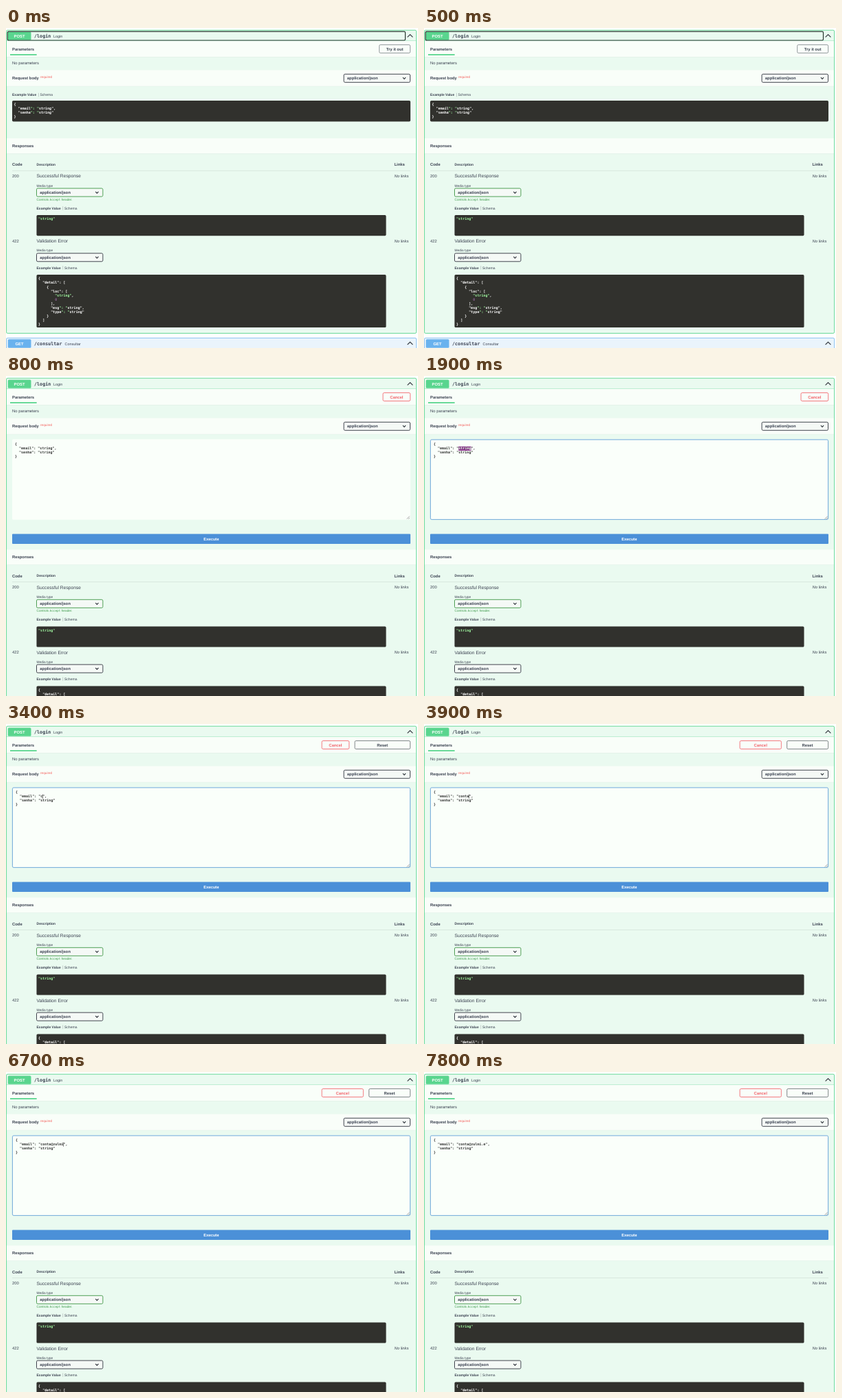
Recreate the animation shown at these times as an HTML page. Size 600x467 px, loop 8000 ms.

```html
<!DOCTYPE html>
<html lang="en">
<head>
<meta charset="utf-8">
<title>API form</title>
<style>
html, body { margin: 0; width: 100%; height: 100%; overflow: hidden; background: #fff; }
svg { display: block; width: 100vw; height: 100vh; }
text { font-family: "Liberation Sans", Arial, sans-serif; fill: #3b4151; white-space: pre; text-rendering: geometricPrecision; }
.b { font-weight: 700; }
.i { font-style: italic; }
.m { font-family: "DejaVu Sans Mono", monospace; }
.str { fill: #a2fca2; }
.num { fill: #8d5f95; }
</style>
</head>
<body>
<svg id="stage" viewBox="0 0 600 467" preserveAspectRatio="none"></svg>
<script>
const NS = 'http://www.w3.org/2000/svg';
const stage = document.getElementById('stage');
const INK = '#3b4151', GREEN = '#59d58e', RED = '#f2616b', BLUE = '#4b90d8';
const S = 5.88, SMALL = 5.04, BIG = 6.72, PITCH = SMALL * 0.602;
const LOOP = 8000, GROW = 92.3;

function add(parent, tag, attrs = {}) {
  const el = document.createElementNS(NS, tag);
  for (const k in attrs) el.setAttribute(k, attrs[k]);
  parent.appendChild(el);
  return el;
}
const group = parent => add(parent, 'g');
const show = (el, on) => el.setAttribute('display', on ? 'inline' : 'none');

// y is the middle of the capitals
function text(parent, str, x, y, size, cls = '', extra = {}) {
  const el = add(parent, 'text', { x, y: y + size * 0.35, 'font-size': size, class: cls, ...extra });
  el.textContent = str;
  return el;
}
const middle = (fill = INK) => ({ 'text-anchor': 'middle', style: `fill:${fill}` });

function rect(parent, x, y, width, height, fill, extra = {}) {
  return add(parent, 'rect', { x, y, width, height, fill, ...extra });
}
const outline = (stroke, w = 0.85) => ({ stroke, 'stroke-width': w, rx: 1.7 });

function bar(parent, y, h) {
  rect(parent, 1, y + 0.5, 596, h, '#dfeee5');
  rect(parent, 1, y, 596, h, '#f9fef9');
}
function chevron(parent, x, y, w, h) {
  add(parent, 'path', { d: `M${x - w} ${y + h}L${x} ${y - h}L${x + w} ${y + h}`, fill: 'none', stroke: '#30343c', 'stroke-width': 1.15 });
}
function select(parent, x, y, stroke) {
  rect(parent, x, y, 96.5, 12, '#f5f9f6', outline(stroke, 1));
  text(parent, 'application/json', x + 4.8, y + 6, S, 'b');
  chevron(parent, x + 88, y + 6, 2.1, -1.1);
}
function tabs(parent, x, y) {
  text(parent, 'Example Value', x, y, SMALL, 'b');
  rect(parent, x + 38.2, y - 2.8, 0.4, 5.6, '#8b9099');
  text(parent, 'Schema', x + 40.5, y, SMALL);
}
// Colours quoted values and numbers, keeps keys white
function code(parent, lines, x, y) {
  lines.forEach((line, n) => {
    const el = text(parent, '', x, y + n * 6.03, SMALL, 'm b', { style: 'fill:#fff' });
    line.split(/("[^"]*"(?!:)|\b\d+\b)/).forEach(part => {
      const cls = /^"[^"]*"$/.test(part) ? 'str' : /^\d+$/.test(part) ? 'num' : '';
      const span = add(el, 'tspan', cls ? { class: cls } : {});
      span.textContent = part;
    });
  });
}
function codeBox(parent, x, y, w, h, lines) {
  rect(parent, x, y, w, h, '#31312d', { rx: 1.7 });
  code(parent, lines, x + 2.6, y + 5.6);
}
function button(parent, x, w, label, colour, ink) {
  const box = rect(parent, x, 24.5, w, 12, '#f9fef9', outline(colour));
  const txt = text(parent, label, x + w / 2, 30.5, S, 'b', middle(ink));
  return (nx, nw) => {
    box.setAttribute('x', nx);
    box.setAttribute('width', nw);
    txt.setAttribute('x', nx + nw / 2);
  };
}
function summary(parent, y, verb, colour, path, label, labelX) {
  rect(parent, 2.8, y - 6.2, 33.7, 12.4, colour, { rx: 1.5 });
  text(parent, verb, 19.6, y + 0.2, S, 'b', middle('#fff'));
  text(parent, path, 41, y, BIG, 'm b');
  text(parent, label, labelX, y + 0.1, 5.46);
  chevron(parent, 588.5, y - 0.2, 3.9, 1.9);
}
function response(parent, y, status, title, stroke) {
  text(parent, status, 9, y, S);
  text(parent, title, 44.5, y + 0.3, BIG);
  text(parent, 'No links', 565.5, y, S, 'i');
  text(parent, 'Media type', 44.5, y + 14.1, 4.85);
  select(parent, 44.5, y + 18.2, stroke);
}

// Operation block
const block = rect(stage, 0.6, 3.2, 597, 442.3, '#eafaf0', outline(GREEN, 0.9));
rect(stage, 1, 18.3, 596, 0.5, '#8fdfb4');
bar(stage, 19, 23);
summary(stage, 11.6, 'POST', GREEN, '/login', 'Login', 69);
const focusRing = rect(stage, 2.2, 5.2, 579.3, 12.8, 'none', outline('#26362e', 1.2));
text(stage, 'Parameters', 9, 30.7, S, 'b');
rect(stage, 6, 38.1, 38.7, 1.8, GREEN);
text(stage, 'No parameters', 9, 50.6, S);
bar(stage, 61.5, 23.3);
text(stage, 'Request body', 9, 73.1, S, 'b');
text(stage, 'required', 50, 71.6, 4.7, '', { style: 'fill:#f4605c' });
select(stage, 492, 67.3, '#41444e');

// Read-only view
const idle = group(stage);
button(idle, 543.6, 45, 'Try it out', '#858a90', INK);
tabs(idle, 9, 97.6);
codeBox(idle, 9, 106, 580, 30.4, ['{', '  "email": "string",', '  "senha": "string"', '}']);

// Editing view
const edit = group(stage);
const area = rect(edit, 9, 92.3, 580, 117.5, '#fafffa', { rx: 1.7 });
const ring = rect(edit, 9.4, 92.9, 579.2, 116.5, 'none', outline('#5f9fd6', 0.9));
add(edit, 'path', { d: 'M583.8 208.6l4-4M586 208.8l1.9-1.9', stroke: '#666', 'stroke-width': 0.6 });
const mark = rect(edit, 0, 102.8, 6 * PITCH, 6.2, '#8c3a8e');
const body = group(edit);
const rows = [0, 1, 2, 3].map(n => text(body, '', 13, 99.2 + n * 5.88, SMALL, 'm b', { style: 'fill:#333' }));
const picked = text(edit, 'string', 0, 105.6, SMALL, 'm b', { style: 'fill:#fff' });
const caret = rect(edit, 0, 102.7, 0.6, 6.2, '#222');
rect(edit, 9, 230.6, 580, 14.5, BLUE, { rx: 1 });
text(edit, 'Execute', 299, 238, S, 'b', middle('#fff'));
const cancel = button(edit, 549, 39.7, 'Cancel', RED, RED);
const resetGroup = group(edit);
const reset = button(resetGroup, 508, 80.6, 'Reset', '#6d7277', INK);

// Responses and the next operation
const lower = group(stage);
bar(lower, 161, 22);
text(lower, 'Responses', 9, 172, S, 'b');
text(lower, 'Code', 9, 199.3, S, 'b');
text(lower, 'Description', 44.5, 199.1, SMALL, 'b');
text(lower, 'Links', 565.5, 199.3, S, 'b');
rect(lower, 9, 207.9, 580, 0.5, '#c3d2ca');
response(lower, 215.8, '200', 'Successful Response', '#4f9f55');
const note = text(lower, 'Controls ', 44.5, 250.4, 4.75, '', { style: 'fill:#3f9a4c' });
add(note, 'tspan', { class: 'm', 'font-size': 4.4 }).textContent = 'Accept';
add(note, 'tspan').textContent = ' header.';
tabs(lower, 44.5, 262.9);
codeBox(lower, 44.5, 273.1, 509, 30.2, ['"string"']);
response(lower, 310.6, '422', 'Validation Error', '#41444e');
tabs(lower, 44.5, 349.8);
codeBox(lower, 44.5, 360.1, 509, 77, [
  '{', '  "detail": [', '    {', '      "loc": [', '        "string",', '        0',
  '      ],', '      "msg": "string",', '      "type": "string"', '    }', '  ]', '}'
]);
rect(lower, 0.6, 452.4, 597, 30, '#eaf4fc', outline('#7ebcf0', 0.9));
summary(lower, 460.5, 'GET', '#69b2ee', '/consultar', 'Consultar', 85.5);

const MAIL = 'conta@zulmi.e';
const KEYS = [3400, 3500, 3600, 3800, 3900, 4400, 4700, 4900, 5100, 5300, 5500, 6900, 7200];
const easeOut = u => 1 - (1 - u) ** 2;

function draw(time) {
  const t = Math.floor(time / 100) * 100;
  const open = t >= 800, focused = t >= 1800;
  const typed = KEYS.filter(k => k <= t).length;
  const selecting = t >= 1900 && !typed;

  show(focusRing, t < 600);
  show(idle, !open);
  show(edit, open);
  block.setAttribute('height', 442.3 + (open ? GROW : 0));
  lower.setAttribute('transform', `translate(0 ${open ? GROW : 0})`);

  show(ring, focused);
  body.setAttribute('transform', focused ? 'translate(0.9 0.5)' : 'translate(0 0)');
  const value = typed ? MAIL.slice(0, typed) : 'string';
  ['{', `  "email": "${value}",`, '  "senha": "string"', '}'].forEach((s, n) => rows[n].textContent = s);

  const start = 13.9 + 12 * PITCH;
  show(mark, selecting);
  show(picked, selecting);
  mark.setAttribute('x', start);
  picked.setAttribute('x', start);

  const since = t - (typed ? KEYS[typed - 1] : 1800);
  show(caret, focused && !selecting && since % 1200 < 600);
  caret.setAttribute('x', start + (typed || 6) * PITCH - 0.2);

  show(resetGroup, typed > 0);
  if (typed) {
    const w = 39.7 + 20.6 * easeOut(Math.min(1, (t - 3400) / 300));
    cancel(460, w);
    reset(468.3 + w, 120.3 - w);
  } else {
    cancel(549, 39.7);
  }
}

const begin = performance.now();
function tick() {
  draw((performance.now() - begin) % LOOP);
  requestAnimationFrame(tick);
}
tick();
</script>
</body>
</html>
```
